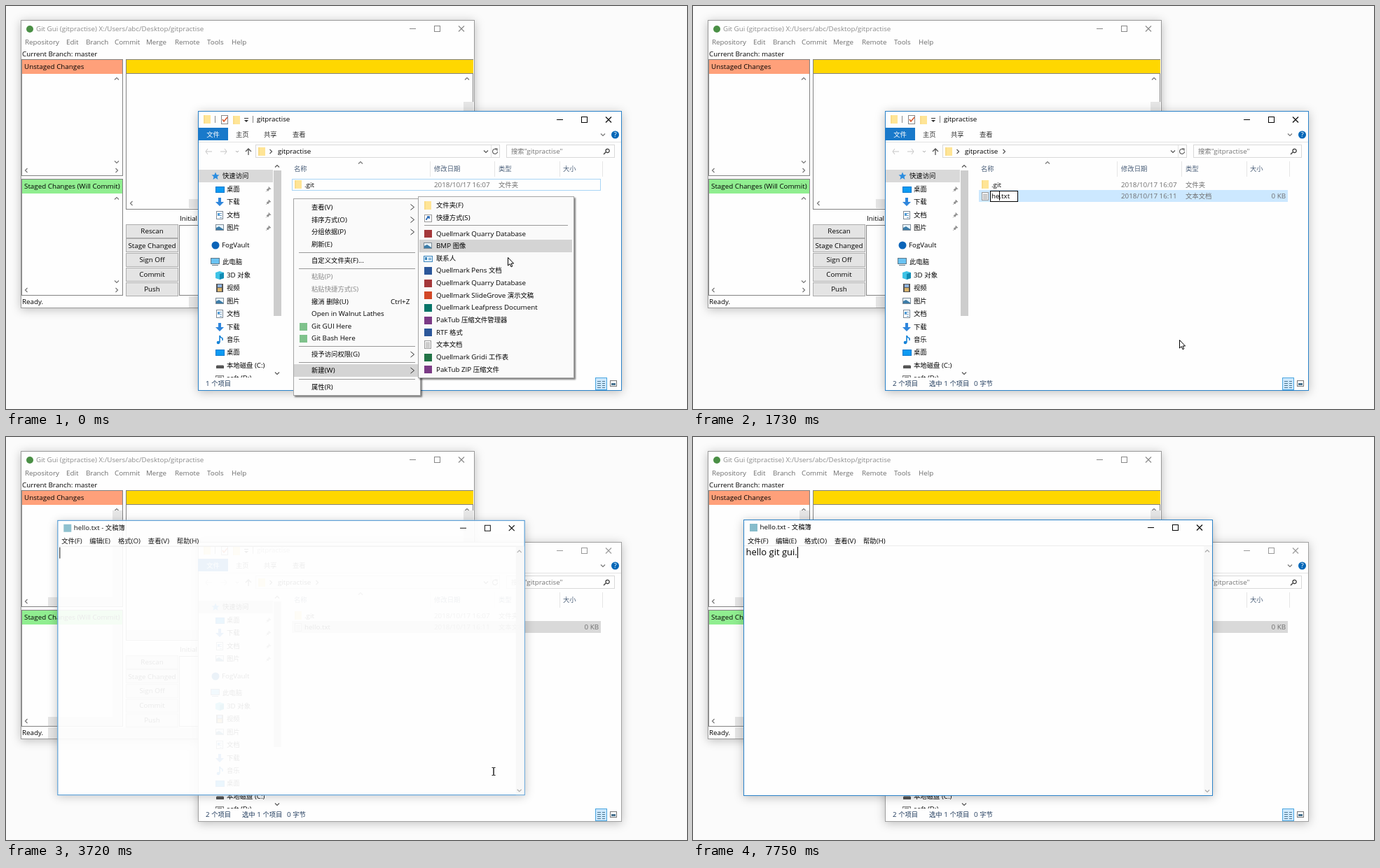
An HTML page with a canvas that plays this animation: 972x576 px, repeating every 8000 ms.

```html
<!DOCTYPE html>
<html lang="zh">
<head>
<meta charset="utf-8">
<title>hello.txt</title>
<style>
html, body { margin: 0; width: 100%; height: 100%; overflow: hidden; background: #fbfbfb }
canvas { display: block }
</style>
</head>
<body>
<canvas id="stage" width="972" height="576"></canvas>
<script>
const g = document.getElementById('stage').getContext('2d');
const LOOP = 8000, BLUE = '#1979ca', PAPER = '#fefefe', DIM = '#6d6d6d';
const FONTS = '"Open Sans", "Noto Sans CJK SC", "Noto Sans CJK", sans-serif';

// Latin and Chinese runs have slightly different sizes
function text(s, x, y, color = '#000', align = 0, latin = 9.8) {
  const runs = s.match(/[\u2e80-\uffff]+|[^\u2e80-\uffff]+/g) || [];
  const setFont = r => g.font = `${r > '\u2e80' ? 9.35 : latin}px ${FONTS}`;
  const widths = runs.map(r => (setFont(r), g.measureText(r).width));
  x -= align * widths.reduce((a, b) => a + b, 0);
  g.fillStyle = color;
  runs.forEach((r, i) => {
    setFont(r);
    g.fillText(r, x, y + latin * .34);
    x += widths[i];
  });
  return x;
}

function box(x, y, w, h, fill, stroke) {
  if (fill) { g.fillStyle = fill; g.fillRect(x, y, w, h); }
  if (stroke) {
    g.strokeStyle = stroke;
    g.lineWidth = 1;
    g.strokeRect(x + .5, y + .5, w - 1, h - 1);
  }
}

function path(d, x, y, stroke, fill, width = 1) {
  g.save();
  g.translate(x, y);
  const p = new Path2D(d);
  if (fill) { g.fillStyle = fill; g.fill(p); }
  if (stroke) { g.strokeStyle = stroke; g.lineWidth = width; g.stroke(p); }
  g.restore();
}

function dot(x, y, r, fill) {
  g.fillStyle = fill;
  g.beginPath();
  g.arc(x, y, r, 0, 7);
  g.fill();
}

const CHEVRONS = {
  '^': 'M-3 1.5L0-1.5L3 1.5', 'v': 'M-3-1.5L0 1.5L3-1.5',
  '<': 'M1.5-3L-1.5 0L1.5 3', '>': 'M-1.5-3L1.5 0L-1.5 3'
};
const chevron = (dir, x, y, color = '#777') => path(CHEVRONS[dir], x, y, color, null, 1.2);
const square = color => (x, y) => box(x - 5, y - 5, 11, 11, color);

const ICONS = {
  folder(x, y) { box(x - 5, y - 6, 10, 12, '#ffe596'); box(x - 5, y - 6, 2, 12, '#f9dc8a'); },
  doc(x, y) {
    box(x - 5, y - 6, 10, 12, '#f4f4f4', '#9a9a9a');
    for (let i = -3; i < 5; i += 2) box(x - 3, y + i, 6, 1, '#a5a5a5');
  },
  page(x, y) {
    box(x - 5, y - 6, 10, 12, '#fff', '#7d8a97');
    box(x - 3, y - 3, 3, 3, '#4d9bd8');
    for (const i of [-3, 0, 3]) box(x + (i ? 0 : -3), y + i, i ? 3 : 6, 1, '#6d9fc6');
  },
  desk(x, y) { box(x - 6, y - 4, 13, 9, '#0c9af2', '#0878cf'); },
  down(x, y) { path('M-2-6H2V0H6L0 6L-6 0H-2Z', x, y, null, '#2f86dc'); },
  image(x, y) {
    box(x - 6, y - 5, 12, 9, '#eaf5fc', '#7f8b96');
    path('M-5 3V0L-1-2L5 2V3Z', x, y, null, '#3b7ca8');
  },
  cloud(x, y) { dot(x, y, 5.5, '#0a64b8'); },
  pc(x, y) { box(x - 6, y - 6, 13, 9, '#69c3f3', '#5f7888'); box(x - 4, y + 4, 9, 1, '#5f7888'); },
  cube(x, y) {
    path('M-6-4L0-6L6-4V4L0 6L-6 4Z', x, y, null, '#3ec3e6');
    path('M0-2L6-4V4L0 6Z', x, y, null, '#118bb4');
  },
  film(x, y) { box(x - 5, y - 6, 10, 12, '#555'); box(x - 3, y - 5, 6, 4, '#8fb4e0'); box(x - 3, y, 6, 5, '#d9b36a'); },
  note(x, y) {
    path('M0-6V4M0-6Q1-3 4-2V1', x, y, '#1683d8', null, 1.6);
    dot(x - 2, y + 4, 2.3, '#1683d8');
  },
  drive(x, y) { box(x - 5, y, 11, 4, '#555'); box(x - 4, y - 1, 9, 1, '#aaa'); },
  disk(x, y) { box(x - 6, y - 4, 12, 9, '#eee', '#777'); box(x - 3, y - 2, 6, 2, '#777'); },
  star(x, y) { path('M0-5.5L1.6-1.8L5.5-1.5L2.5 1L3.5 5L0 2.8L-3.5 5L-2.5 1L-5.5-1.5L-1.6-1.8Z', x, y, null, '#2b8de0'); },
  link(x, y) { box(x - 5, y - 5, 11, 11, '#fff', '#999'); path('M-2 3Q-2 0 1-1M-1-2H2V1', x, y, '#2265b5', null, 1.6); },
  card(x, y) {
    box(x - 6, y - 4, 13, 9, '#e6f3fc', '#3c86bd');
    box(x - 4, y - 2, 3, 4, '#3c86bd');
    box(x + 1, y - 1, 4, 1, '#3c86bd');
    box(x + 1, y + 1, 4, 1, '#3c86bd');
  },
  red: square('#a4373a'), navy: square('#2b579a'), orange: square('#d24726'),
  teal: square('#077568'), green: square('#217346'), purple: square('#7b3a86'),
  mint: square('#7fc28c')
};
const icon = (name, x, y) => ICONS[name](x, y);

// The shadow is kept outside the window so that a fading window stays clean
function frame(x, y, w, h, border) {
  g.save();
  g.beginPath();
  g.rect(x - 30, y - 30, w + 60, h + 60);
  g.rect(x, y, w, h);
  g.clip('evenodd');
  g.shadowColor = 'rgba(0,0,0,.25)';
  g.shadowBlur = 13;
  g.shadowOffsetY = 2;
  box(x, y, w, h, PAPER);
  g.restore();
  box(x, y, w, h, PAPER, border);
}

function controls(xMin, xMax, xClose, y, color) {
  box(xMin - 4, y, 9, 1, color);
  box(xMax - 4, y - 4, 9, 9, null, color);
  path('M-4-4L4 4M4-4L-4 4', xClose, y + .5, color, null, 1.1);
}

const GIT_MENU = [['Repository', 27], ['Edit', 86], ['Branch', 114], ['Commit', 155],
  ['Merge', 200], ['Remote', 241], ['Tools', 287], ['Help', 322]];
const TRACKS = [[152, 98, 14, 131], [23, 229, 143, 13], [152, 268, 14, 132], [23, 400, 143, 13],
  [653, 98, 14, 178], [172, 276, 481, 13], [172, 415, 495, 16], [23, 415, 149, 16]];

function pane(y, title, color) {
  box(22, y, 145, 167, PAPER, '#828282');
  box(23, y + 1, 143, 20, color);
  text(title, 26, y + 11);
  chevron('^', 158, y + 28);
  chevron('v', 158, y + 147);
  chevron('<', 29, y + 159);
  chevron('>', 158, y + 159);
}

function gitWindow() {
  frame(21, 20, 648, 412, '#999');
  dot(34, 33, 5, '#4a8f45');
  text('Git Gui (gitpractise) X:/Users/abc/Desktop/gitpractise', 43, 33, '#8c8c8c');
  controls(580, 615, 650, 32, '#888');
  for (const [s, x] of GIT_MENU) text(s, x, 52, DIM);
  text('Current Branch: master', 23, 68.5);
  pane(76, 'Unstaged Changes', '#ffa07a');
  pane(247, 'Staged Changes (Will Commit)', '#90ee90');
  box(171, 76, 496, 215, PAPER, '#828282');
  box(172, 77, 495, 19, '#ffd700');
  box(172, 96, 495, 1, '#828282');
  chevron('^', 658, 104);
  chevron('<', 179, 282);
  text('Initial Commit Message:', 248, 304);
  box(247, 313, 420, 101, PAPER, '#828282');
  ['Rescan', 'Stage Changed', 'Sign Off', 'Commit', 'Push'].forEach((s, i) => {
    const y = 321.7 + 20.7 * i;
    box(171, Math.round(y) - 10, 75, 20, '#e4e4e4', '#adadad');
    text(s, 208.5, y, '#000', .5);
  });
  text('Ready.', 23, 423);
}

// Scrollbar tracks show only where a nearer window shades them
function shadeTracks(x, y, w, h) {
  g.save();
  g.beginPath();
  g.rect(x - 13, y - 13, w + 26, h + 26);
  g.clip();
  for (const r of TRACKS) box(...r, '#e6e6e6');
  g.restore();
}

const SIDEBAR = [['桌面', 261.5, 'desk'], ['下载', 280, 'down'], ['文档', 298.5, 'page'], ['图片', 317, 'image'],
  ['3D 对象', 384.5, 'cube'], ['视频', 403, 'film'], ['图片', 421.5, 'image'], ['文档', 440, 'page'],
  ['下载', 458.5, 'down'], ['音乐', 476.5, 'note'], ['桌面', 495, 'desk'], ['本地磁盘 (C:)', 513.5, 'drive'],
  ['soft (D:)', 532, 'disk']];

function sidebar() {
  g.save();
  g.beginPath();
  g.rect(275, 222, 120, 309);
  g.clip();
  box(275, 234, 106, 18, '#d9d9d9');
  icon('star', 299, 243);
  text('快速访问', 309, 243);
  SIDEBAR.forEach(([s, y, name], i) => {
    icon(name, 305, Math.round(y));
    text(s, 315, y);
    if (i < 4) path('M0-3L3 0L1 0L-1 3L-3 1L0-1ZM-2 2L-4 4', 375, y, '#909090', '#909090', .7);
  });
  icon('cloud', 299, 342);
  text('FogVault', 308, 341.5);
  icon('pc', 298, 366);
  text('此电脑', 309, 366);
  box(382, 235, 11, 208, '#cdcdcd');
  chevron('^', 387, 229, '#555');
  chevron('v', 387, 525, '#555');
  g.restore();
}

function explorer(t) {
  const active = t < 3600, ink = active ? '#000' : '#999', made = t >= 870;
  frame(274, 150, 605, 400, active ? '#2a82c9' : '#a0a0a0');
  icon('folder', 287, 162);
  box(298, 157, 1, 10, '#888');
  box(307, 156, 10, 13, '#fff', '#888');
  path('M-3 0L-1 3L4-3', 312, 162, '#d9572b', null, 1.5);
  icon('folder', 329, 163);
  box(340, 160, 6, 1, '#333');
  path('M-3 0H3L0 3Z', 343, 163, null, '#333');
  box(352, 157, 1, 10, '#888');
  text('gitpractise', 358, 162, ink);
  controls(790, 825, 860, 162, ink);

  box(274, 174, 43, 18, BLUE);
  text('文件', 295.5, 184, '#fff', .5);
  text('主页', 328, 184, '#333');
  text('共享', 368, 184, '#333');
  text('查看', 409, 184, '#333');
  chevron('v', 852, 184);
  dot(869.5, 184, 5.5, '#0067b8');
  text('?', 869.5, 184, '#fff', .5);
  box(275, 194, 603, 1, '#e3e3e3');

  path('M5 0H-4M-1-4L-4 0L-1 4', 289, 208, '#c4c4c4');
  path('M-5 0H4M1-4L4 0L1 4', 311, 208, '#c4c4c4');
  path('M-2-1L0 1L2-1', 330, 208, '#aaa');
  path('M0 5V-4M-4 0L0-4L4 0', 346, 208, '#555', null, 1.3);
  box(356, 198, 349, 19, PAPER, '#d9d9d9');
  icon('folder', 365, 208);
  chevron('>', 378, 208, '#555');
  text('gitpractise', 388, 207.5);
  if (t >= 990) chevron('>', 444, 208, '#555');
  chevron('v', 685, 208, '#555');
  box(692, 199, 1, 17, '#e3e3e3');
  path('M2-3A3.5 3.5 0 1 0 3.5 0M0-4H3V-1', 698, 208, '#555', null, 1.1);
  box(714, 198, 155, 19, PAPER, '#d9d9d9');
  text('搜索"gitpractise"', 721, 208, '#767676');
  path('M-1 1L-4 4M-1-1A2.6 2.6 0 1 1 4.2-1A2.6 2.6 0 1 1-1-1', 857, 208, '#333', null, 1.2);

  for (const [s, x] of [['名称', 411], ['修改日期', 611], ['类型', 703], ['大小', 795]]) text(s, x, 232.5, '#4c607a');
  for (const x of [605, 697, 790, 851]) box(x, 222, 1, 22, '#e5e5e5');
  chevron('^', 506, 224);
  sidebar();

  if (!made) box(408, 247, 441, 17, null, '#a9d5f5');
  icon('folder', 417, 255);
  text('.git', 426, 255.5);
  text('2018/10/17 16:07', 611, 255.5, DIM);
  text('文件夹', 703, 255.5, DIM);
  if (made) newFile(t, active);

  text(made ? '2 个项目' : '1 个项目', 285, 540, '#1e395b');
  if (made) {
    text('选中 1 个项目', 337, 540, '#1e395b');
    text('0 字节', 401, 540, '#1e395b');
  }
  box(841, 531, 17, 18, '#cce8ff', '#4aa5df');
  for (const y of [536, 539, 542, 545]) {
    box(844, y, 5, 1, '#4d7690');
    box(851, y, 4, 1, '#4d7690');
  }
  box(862, 535, 10, 9, '#fff', '#777');
  box(864, 539, 6, 3, '#456f8c');
}

const stepAt = (t, steps) => steps.reduce((s, [at, v]) => t >= at ? v : s, '');
const NAME_STEPS = [[870, '新建文本文档'], [1730, 'he'], [2370, 'hel'], [2490, 'hell'], [2610, 'hello']];

function newFile(t, active) {
  const name = stepAt(t, NAME_STEPS);
  box(408, 263, 441, 17, active ? '#cce8ff' : '#d9d9d9', t >= 3230 && active ? '#99d1ff' : null);
  icon('doc', 417, 272);
  text('2018/10/17 16:11', 611, 271.5, DIM);
  text('文本文档', 703, 271.5, DIM);
  text('0 KB', 846, 271.5, DIM, 1);
  if (t >= 3230) { text('hello.txt', 426, 271.5); return; }
  const selected = t < 1730;
  g.font = `9.8px ${FONTS}`;
  const ext = g.measureText('.txt').width;
  const end = text(name, 426, 271.5);
  box(424, 264, end + ext + 12 - 424 | 0, 16, '#fff', '#000');
  if (selected) box(426, 265, end - 426, 13, '#0078d7');
  text(name, 426, 271.5, selected ? '#fff' : '#000');
  text('.txt', end, 271.5);
  if (t < 1480 || !selected) box(Math.floor(end), 265, 1, 13, '#000');
}

// label, centre y, extra: > submenu, - disabled, * logo
const CONTEXT = [['查看(V)', 287.5, '>'], ['排序方式(O)', 305.5, '>'], ['分组依据(P)', 323, '>'], ['刷新(E)', 341],
  ['自定义文件夹(F)...', 364], ['粘贴(P)', 387, '-'], ['粘贴快捷方式(S)', 405, '-'], ['撤消 删除(U)', 422.5],
  ['Open in Walnut Lathes', 440], ['Git GUI Here', 457.5, '*'], ['Git Bash Here', 475, '*'],
  ['授予访问权限(G)', 498, '>'], ['新建(W)', 521, '>'], ['属性(R)', 544.5]];
const NEW_MENU = [['文件夹(F)', 'folder'], ['快捷方式(S)', 'link'], ['Quellmark Quarry Database', 'red'],
  ['BMP 图像', 'image'], ['联系人', 'card'], ['Quellmark Pens 文档', 'navy'], ['Quellmark Quarry Database', 'red'],
  ['Quellmark SlideGrove 演示文稿', 'orange'], ['Quellmark Leafpress Document', 'teal'], ['PakTub 压缩文件管理器', 'purple'],
  ['RTF 格式', 'navy'], ['文本文档', 'doc'], ['Quellmark Gridi 工作表', 'green'], ['PakTub ZIP 压缩文件', 'purple']];
const PITCH = 17.65;
const rowY = i => i < 2 ? 285 + 17.7 * i : 325.2 + PITCH * (i - 2);

function menuBox(x, y, w, h) {
  g.save();
  g.shadowColor = 'rgba(0,0,0,.5)';
  g.shadowBlur = 2;
  g.shadowOffsetX = g.shadowOffsetY = 2;
  box(x, y, w, h, '#fafafa');
  g.restore();
  box(x, y, w, h, null, '#a5a5a5');
}

function newItem(i, lit) {
  const y = rowY(i), [label, name] = NEW_MENU[i];
  if (lit) box(590, Math.round(y) - 9, 218, 18, lit);
  icon(name, 602, Math.round(y));
  text(label, 614, y);
}

function menus(lit) {
  menuBox(410, 275, 182, 282);
  box(411, 512, 180, 18, '#d4d4d4');
  for (const y of [352, 375, 486, 509, 533]) box(418, y, 166, 1, '#999');
  for (const [s, y, kind] of CONTEXT) {
    text(s, 436, y, kind === '-' ? '#8a8a8a' : '#000');
    if (kind === '>') path('M-2.5-4L2.5 0L-2.5 4', 580, y, '#333');
    if (kind === '*') icon('mint', 424, Math.round(y));
  }
  text('Ctrl+Z', 549, 422.5);
  menuBox(588, 272, 223, 260);
  box(597, 313, 205, 1, '#999');
  NEW_MENU.forEach((_, i) => newItem(i, i === lit && '#d4d4d4'));
}

const TYPED = [[4350, 'h'], [4480, 'he'], [4750, 'hel'], [4870, 'hell'], [5120, 'hello'], [5240, 'hello '],
  [5770, 'hello g'], [5900, 'hello gi'], [6050, 'hello git'], [6170, 'hello git '], [6290, 'hello git g'],
  [6410, 'hello git gi'], [6930, 'hello git g'], [7220, 'hello git gui'], [7750, 'hello git gui.']];

function notepad(t) {
  const [scale, alpha] = t < 3720 ? [.965, .55] : t < 3840 ? [.996, .92] : [1, 1];
  g.save();
  g.globalAlpha = alpha;
  g.translate(407, 315.5);
  g.scale(scale, scale);
  g.translate(-407, -315.5);
  frame(72, 118, 670, 395, '#2a82c9');
  box(81, 124, 11, 11, '#86bccb');
  text('hello.txt - 文稿簿', 95.5, 129);
  controls(653, 688, 723, 129, '#000');
  for (const [s, x] of [['文件(F)', 78], ['编辑(E)', 118], ['格式(O)', 159], ['查看(V)', 202], ['帮助(H)', 243]]) text(s, x, 148.5);
  box(73, 155, 668, 1, '#ececec');
  box(729, 156, 12, 356, '#f8f8f8');
  chevron('^', 734, 163, '#aaa');
  chevron('v', 734, 506, '#aaa');
  const end = text(stepAt(t, TYPED), 75.5, 165, '#000', 0, 13);
  if (t < 4100 || t >= 4350) box(Math.round(end - .3), 157, 1, 16, '#000');
  g.restore();
}

function pointer(t, x, y) {
  if (t >= 4350) return;
  if (t >= 3720) {
    path('M-2.5-5.5H-.5Q0-5.5 0-5V5Q0 5.5-.5 5.5H-2.5M2.5-5.5H.5Q0-5.5 0-5V5Q0 5.5.5 5.5H2.5', 696, 478, '#222');
    return;
  }
  path('M.5 .5V12L3.2 9.6L5 13.8L6.8 13L5 9H8.6Z', x, y, '#000', '#fff');
  if (t >= 3480) path('M-4.3 0A4.3 4.3 0 1 1 4.3 0A4.3 4.3 0 1 1-4.3 0', 705, 477.5, '#2a97e6', null, 3);
}

function draw(t) {
  const step = t < 150 ? 0 : Math.min(5, Math.floor((t - 150) / 120) + 1);
  const p = Math.sin(step / 5 * Math.PI / 2);
  const x = 716 - 22 * p, y = 359 + 118 * p;
  const lit = step ? 2 + Math.round((y - rowY(2)) / PITCH) : 3;

  box(0, 0, 972, 576, '#fbfbfb');
  gitWindow();
  if (t < 3600) shadeTracks(274, 150, 605, 400);
  else shadeTracks(73, 118, 668, 395);
  explorer(t);
  if (t < 750) menus(lit);
  else if (t < 870) newItem(11, '#e1e1e1');
  if (t >= 3600) notepad(t);
  pointer(t, x, y);
}

function tick() {
  draw(performance.now() % LOOP);
  requestAnimationFrame(tick);
}
tick();
</script>
</body>
</html>
```
